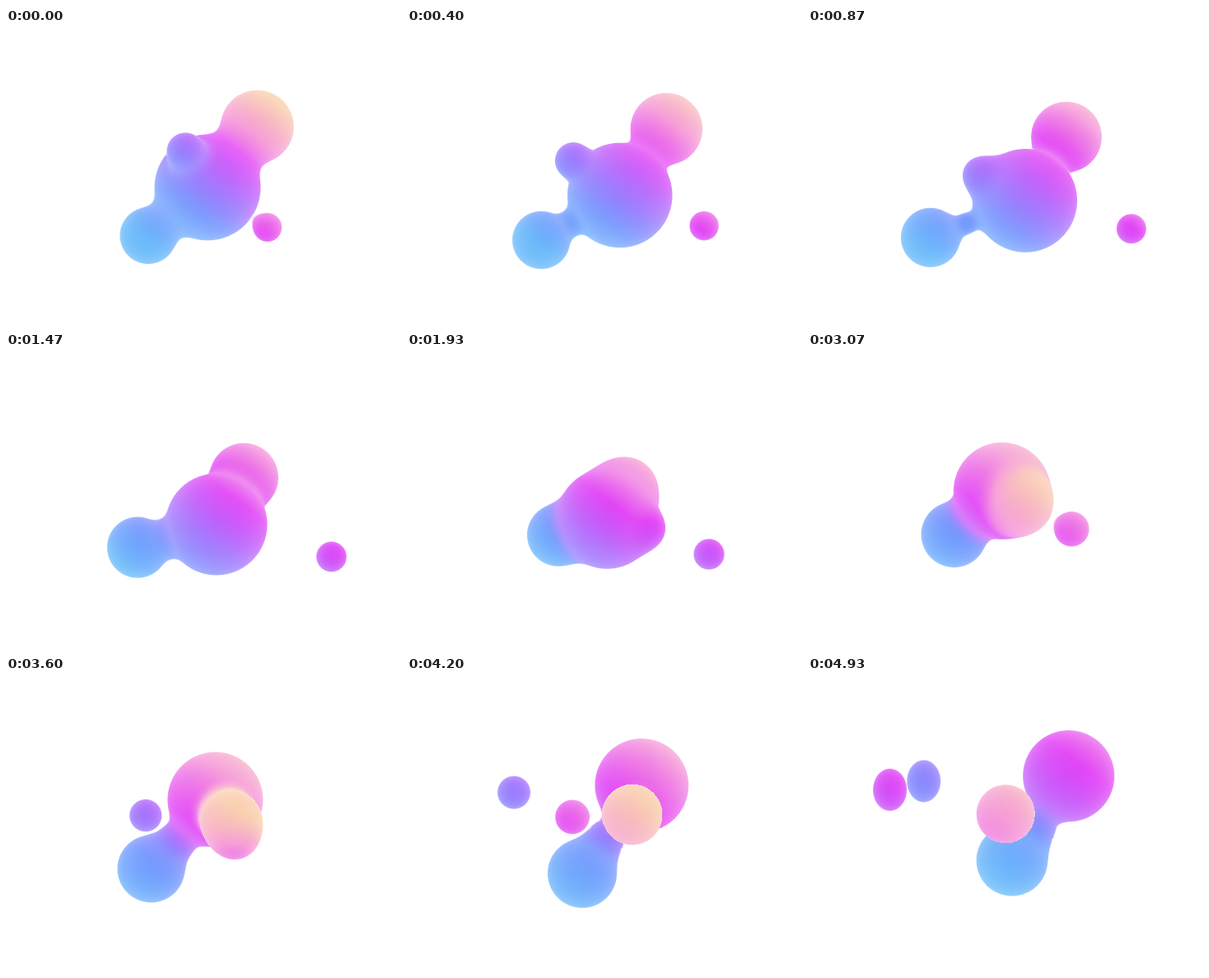
Recreate the animation shown at these times as an HTML page with a canvas. Size 480 by 360 pixels, loop 4990 ms.

```html
<!DOCTYPE html>
<html lang="en">
<head>
<meta charset="utf-8">
<title>Merging blobs</title>
<style>
html, body { margin: 0; width: 100%; height: 100%; overflow: hidden; background: #fff; }
canvas { display: block; }
</style>
</head>
<body>
<canvas id="stage" width="480" height="360"></canvas>
<script>
const W = 480, H = 360, LOOP = 4.99, FPS = 15;
const BLEND = 24; // reach of the soft union, in px
const RAMP = [[106, 186, 250], [118, 152, 254], [172, 114, 253], [226, 66, 246], [246, 156, 216], [249, 206, 174]];

const clamp = (v, lo, hi) => Math.min(hi, Math.max(lo, v));
const mix = (a, b, f) => a + (b - a) * f;

// Motions over time in seconds: a drifting swing, and a steady change over one loop.
const wave = (mid, amp, period, peak, drift = 0) =>
  t => mid + drift * t + amp * Math.cos(2 * Math.PI * (t - peak) / period);
const line = (from, to) => t => mix(from, to, t / LOOP);
const sum = (f, g) => t => f(t) + g(t);

// z points to the viewer; tint is a position on RAMP.
const warming = wave(2.62, .92, 6.5, 3.5);
const big = {
  x: wave(225, 29.7, 4.6, .61, 13),
  y: wave(166, 45, 8, 1.15),
  z: line(0, 0),
  r: line(64, 55),
  tint: warming
};
const peach = {
  x: wave(302, 23, 3.3, .75, -12),
  y: wave(137.5, -19, 4.6, .3, 10),
  z: wave(25, 75, 7, 4.6),
  r: line(44, 35),
  tint: wave(4, .8, 4.8, 3.8)
};
const front = {
  x: wave(313, 100, 5.4, 2.97, -30),
  y: wave(186, 46, 6.6, 2.6, -4),
  z: wave(45, 35, 4.8, 3.8),
  r: line(22, 20),
  tint: warming,
  small: true
};
const sky = {
  x: sum(wave(147, 20, 2.5, 2.3, 15), wave(0, 9, 5, .3)),
  y: wave(244, 17, 3.6, .6, -5),
  z: wave(-12, 28, 4.4, .4),
  r: line(34, 43),
  tint: wave(.55, .4, 6, 2.9)
};
const back = {
  x: wave(263, 137, 6.5, 1.2),
  y: wave(267, 26, 4.7, 2.1, -24),
  z: wave(-30, 70, 6, .3),
  r: line(17, 20),
  tint: line(3.3, 1.4),
  small: true
};
const linkSize = line(5, 24);
const tintSlope = line(.022, .011); // tint change per px towards the upper right

function poseAt(t) {
  const tall = 1 + .25 * clamp((t - 4.2) / .7, 0, 1);
  const balls = [big, peach, front, sky, back].map(b => ({
    x: b.x(t), y: b.y(t), z: b.z(t), r: b.r(t), tint: b.tint(t), tall: b.small ? tall : 1
  }));
  // A link keeps the sky blob tied to the big one.
  const link = { r: linkSize(t), tall: 1 };
  for (const key of ['x', 'y', 'z', 'tint']) link[key] = mix(balls[3][key], balls[0][key], .38);
  return [...balls, link];
}

// Distance to the soft union, with the blended tint and facing.
const hit = { d: 0, tint: 0, facing: 0 };
function probe(balls, x, y, z, slope) {
  let d = 1e9, tint = 0, facing = 0;
  for (const b of balls) {
    const dx = x - b.x, dy = (y - b.y) / b.tall, dz = z - b.z;
    const e = Math.sqrt(dx * dx + dy * dy + dz * dz) - b.r;
    const h = Math.max(BLEND - Math.abs(d - e), 0) / BLEND;
    const share = e < d ? 1 - h * h / 2 : h * h / 2;
    tint = mix(tint, b.tint + slope * (.6 * dx - .8 * dy), share);
    facing = mix(facing, dz / b.r, share);
    d = Math.min(d, e) - h * h * BLEND / 4;
  }
  hit.d = d;
  hit.tint = tint;
  hit.facing = facing;
}

const ctx = document.getElementById('stage').getContext('2d');
const image = ctx.createImageData(W, H);

function paint(i, tint, facing, alpha) {
  const p = clamp(tint, 0, RAMP.length - 1.001), n = Math.floor(p);
  const rim = .33 * (1 - clamp(facing, 0, 1));
  for (let c = 0; c < 3; c++) {
    const base = mix(RAMP[n][c], RAMP[n + 1][c], p - n);
    image.data[i + c] = mix(255, mix(base, 255, rim), alpha);
  }
}

function render(t) {
  const balls = poseAt(t), slope = tintSlope(t);
  image.data.fill(255);
  for (let py = 0; py < H; py++) {
    const y = py + .5;
    const row = balls.filter(b => Math.abs(y - b.y) < (b.r + BLEND) * b.tall);
    if (!row.length) continue;
    for (let px = 0; px < W; px++) {
      const x = px + .5;
      const near = row.filter(b => Math.hypot(x - b.x, (y - b.y) / b.tall) < b.r + BLEND);
      if (!near.length) continue;
      let z = -1e9, end = 1e9;
      for (const b of near) {
        z = Math.max(z, b.z + b.r + 8);
        end = Math.min(end, b.z - b.r - 8);
      }
      // March away from the viewer, keeping the closest approach for soft edges.
      let best = 1e9, tint = 0, facing = 0;
      for (let n = 0; n < 48 && z > end && best > .1; n++) {
        probe(near, x, y, z, slope);
        if (hit.d < best) {
          best = hit.d;
          tint = hit.tint;
          facing = hit.facing;
        }
        z -= Math.max(hit.d, .1);
      }
      if (best < 1) paint((py * W + px) * 4, tint, facing, best <= .1 ? 1 : 1 - best);
    }
  }
  ctx.putImageData(image, 0, 0);
}

let shown = -1;
function tick() {
  const step = Math.floor((performance.now() / 1000 % LOOP + .0034) * FPS);
  if (step !== shown) {
    shown = step;
    render(step / FPS);
  }
  requestAnimationFrame(tick);
}
tick();
</script>
</body>
</html>
```
